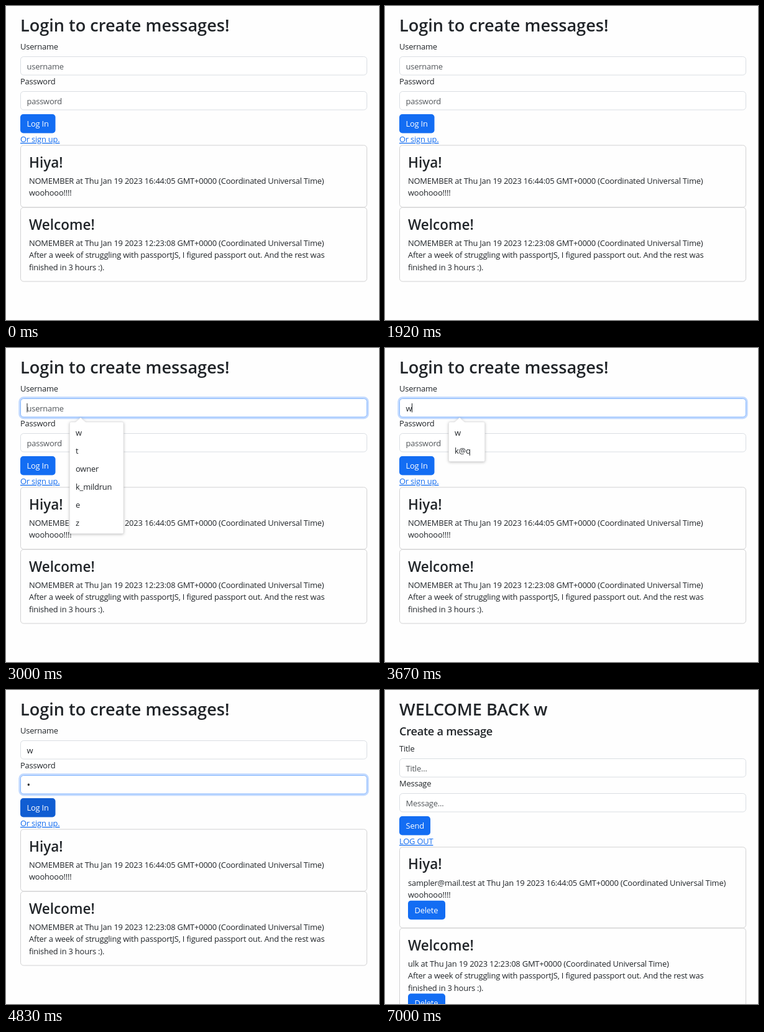
Animation of 600 by 505 pixels, one loop 8 s. Source, as an HTML page:

```html
<!DOCTYPE html>
<html lang="en">
<head>
<meta charset="utf-8">
<title>Message board login</title>
<style>
  html, body { margin: 0; width: 100%; height: 100%; overflow: hidden; background: #fefefe; }
  svg { display: block; width: 600px; height: 505px; }
  text { font: 500 12.9px "Open Sans", "Noto Sans", sans-serif; letter-spacing: -.015em; fill: #212529; white-space: pre; }
  .h1, .h2, .h4 { font-weight: 600; letter-spacing: 0; }
  .h1 { font-size: 27.1px; }
  .h2 { font-size: 22.5px; }
  .h4 { font-size: 18.2px; letter-spacing: -.015em; }
  .hint { fill: #53575b; }
  .secret { font-size: 15px; }
  .link { fill: #126cf0; text-decoration: underline; }
  .label { fill: #fff; }
  .card { fill: none; stroke: #d2d2d3; }
  .popup { fill: #fff; stroke: #e4e4e5; stroke-width: .8; filter: drop-shadow(0 1px 2px rgba(0, 0, 0, .25)); }
</style>
</head>
<body>
<svg id="stage" viewBox="0 0 600 505"></svg>
<script>
const LOOP = 8000, FPS = 12;
const stage = document.getElementById('stage');

const ramp = (t, start, length) => Math.min(1, Math.max(0, (t - start) / length));
const mix = (a, b, p) => `rgb(${a.map((v, i) => Math.round(v + (b[i] - v) * p))})`;
const between = (t, from, to) => t >= from && t < to;

const text = (x, y, content, kind = '') => `<text x="${x}" y="${y}" class="${kind}">${content}</text>`;
const caret = (x, y) => `<path d="M${x} ${y - 12.5}v14.5" stroke="#212529"/>`;

function field(y, content, kind = 'hint', focus = 0) {
  return `<rect x="21.9" y="${y - 1.1}" width="560.2" height="32.7" rx="6.4" fill="none"
      stroke="#0d6efd" stroke-opacity="${.25 * focus}" stroke-width="3.2"/>
    <rect x="23.5" y="${y + .5}" width="557" height="29.5" rx="4.8" fill="#fff"
      stroke="${mix([218, 222, 227], [134, 183, 254], focus)}"/>` + text(33.5, y + 20.5, content, kind);
}

function button(x, y, width, label, dark = 0) {
  return `<rect x="${x}" y="${y}" width="${width}" height="30.5" rx="4.8"
    fill="${mix([19, 109, 243], [16, 93, 210], dark)}"/>` + text(x + 10.5, y + 20, label, 'label');
}

function card(y, height, title, author, date, lines, removable) {
  const stamp = `${author} at Thu Jan 19 2023 ${date} GMT+0000 (Coordinated Universal Time)`;
  return `<rect class="card" x="23.5" y="${y}" width="557" height="${height}" rx="4.8"/>`
    + text(37, y + 35.5, title, 'h2') + text(37, y + 62, stamp)
    + lines.map((line, i) => text(37, y + 81.3 + i * 19.3, line)).join('')
    + (removable ? button(37, y + 66.7 + lines.length * 19.3, 60, 'Delete') : '');
}

function cards(y, authors, removable) {
  const extra = removable ? 30.3 : 0;
  return card(y, 99.5 + extra, 'Hiya!', authors[0], '16:44:05', ['woohooo!!!!'], removable)
    + card(y + 100 + extra, 119 + extra, 'Welcome!', authors[1], '12:23:08', [
      'After a week of struggling with passportJS, I figured passport out. And the rest was',
      'finished in 3 hours :).'
    ], removable);
}

function popup(width, names) {
  const right = 102.5 + width, bottom = 124.5 + names.length * 29;
  return `<path class="popup" d="M104.5 119H112L120 112L128 119H${right - 2}q2 0 2 2V${bottom - 2}
      q0 2 -2 2H104.5q-2 0 -2 -2V121q0 -2 2 -2z"/>`
    + names.map((name, i) => text(112, 141 + i * 29, name)).join('');
}

function loginPage(t) {
  const typed = t >= 3666, secret = t >= 4250;
  const userFocus = ramp(t, 2583, 150) - ramp(t, 3880, 150);
  const passFocus = ramp(t, 3880, 150) - ramp(t, 5380, 150);
  const hover = ramp(t, 4700, 130) - ramp(t, 5580, 150);
  let page = text(23, 41, 'Login to create messages!', 'h1')
    + text(23, 70, 'Username') + field(81, typed ? 'w' : 'username', typed ? '' : 'hint', userFocus)
    + text(23, 126, 'Password') + field(137, secret ? '•' : 'password', secret ? 'secret' : 'hint', passFocus)
    + button(23, 174, 56.5, 'Log In', hover)
    + text(23, 219, 'Or sign up.', 'link')
    + cards(224, ['NOMEMBER', 'NOMEMBER'], false);
  if (between(t, 2583, 3166)) page += caret(34, 101.5);
  if (between(t, 3666, 3916)) page += caret(43.5, 101.5);
  if (between(t, 3916, 4750)) page += caret(secret ? 39.5 : 34, 157.5);
  if (between(t, 2666, 3666)) page += popup(86.5, ['w', 't', 'owner', 'k_mildrun', 'e', 'z']);
  if (between(t, 3666, 3916)) page += popup(58, ['w', 'k@q']);
  return page;
}

function memberPage() {
  return text(23, 41, 'WELCOME BACK w', 'h1')
    + text(23, 73, 'Create a message', 'h4')
    + text(23, 98.5, 'Title') + field(110, 'Title...')
    + text(23, 154.5, 'Message') + field(166, 'Message...')
    + button(23, 203, 50, 'Send')
    + text(23, 248, 'LOG OUT', 'link')
    + cards(252.7, ['sampler@mail.test', 'ulk'], true);
}

let lastStep = -1;
function draw() {
  const step = Math.floor((performance.now() % LOOP + 4) * FPS / 1000);
  if (step !== lastStep) {
    const t = step * 1000 / FPS;
    stage.innerHTML = t >= 7000 ? memberPage() : loginPage(t);
    lastStep = step;
  }
  requestAnimationFrame(draw);
}
draw();
</script>
</body>
</html>
```
